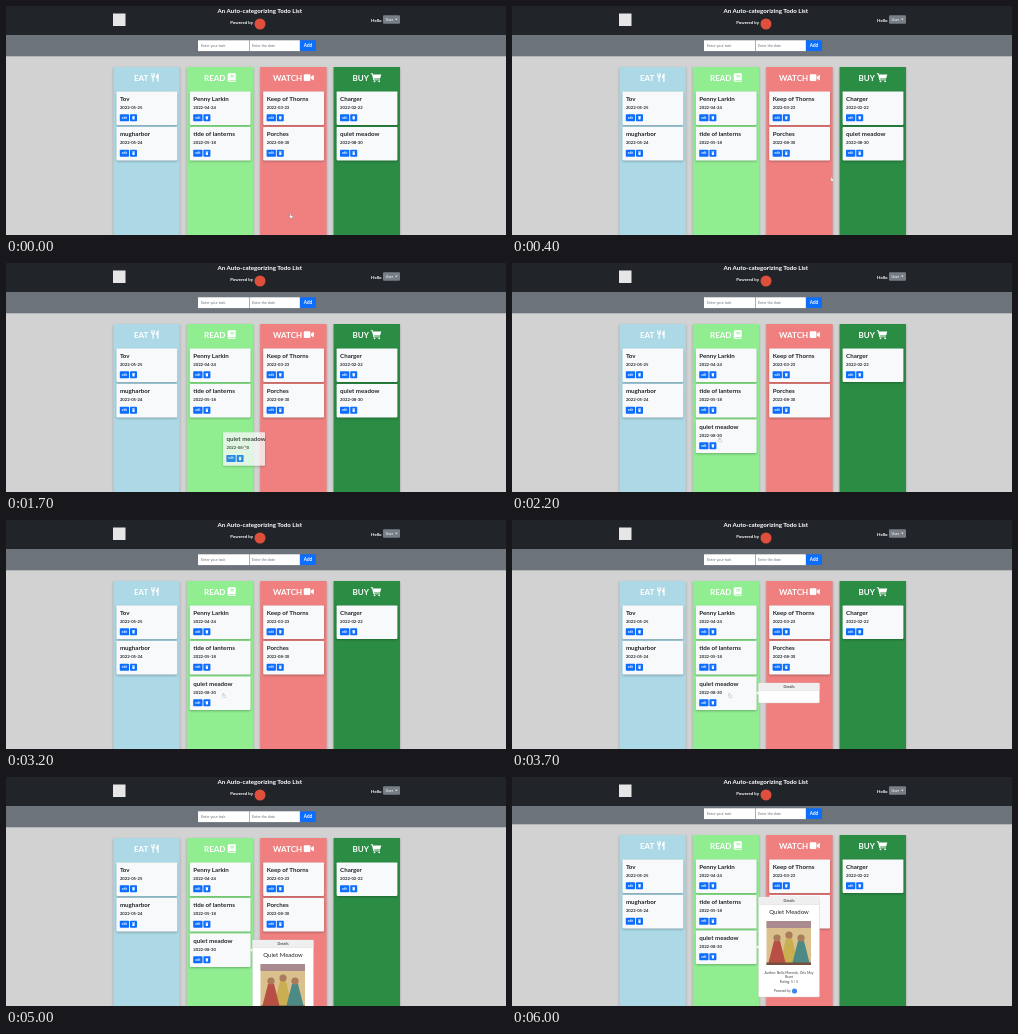
Recreate the animation shown at these times as an HTML page. Size 500 by 229 pixels, loop 6.8 s.

```html
<!DOCTYPE html>
<html lang="en">
<head>
<meta charset="utf-8">
<title>Todo board</title>
<style>
  html, body { margin: 0; height: 100%; overflow: hidden; background: #d2d2d2; }
  svg { display: block; width: 100vw; height: 100vh; }
  text { font-family: Lato, "Open Sans", sans-serif; }
  .b { font-weight: 700; }
  .mid { text-anchor: middle; }
  .card, .col { filter: drop-shadow(0 1px 1.3px #0004); }
</style>
</head>
<body>
<svg id="stage" viewBox="0 0 500 229"></svg>
<script>
const LOOP = 6800, STEP = 100;
const PITCH = 35.5, TOP = 85.5, INSET = 3;

const rect = (x, y, w, h, fill, more = '') =>
  `<rect x="${x}" y="${y}" width="${w}" height="${h}" fill="${fill}" ${more}/>`;
const text = (x, y, size, fill, str, cls = '') =>
  `<text x="${x}" y="${y}" font-size="${size}" fill="${fill}" class="${cls}">${str}</text>`;
const group = (id, body, more = '') => `<g id="${id}" ${more}>${body}</g>`;
const at = (x, y, body) => `<g transform="translate(${x} ${y})">${body}</g>`;

// White heading icons, drawn from their top left corner
const icons = {
  fork: `<path d="M.3 0v3q0 1 1.2 1.2V8.5h1.2V4.2Q3.9 4 3.9 3V0H3.1v2.6H2.5V0H1.7v2.6H1.1V0z
         M7.6 0Q5 1 5 5h1.3v3.5h1.3z"/>`,
  book: `<path d="M1.4 0H8v6.6H7.5v1.2H8v.7H1.5Q0 8.5 0 7V1.4Q0 0 1.4 0z"/>
         <path d="M2.6 2.2h3.8M2.6 3.6h3.8M1.4 7.2h5.5" stroke="#90ee90" stroke-width=".7"/>`,
  video: '<rect y="1" width="6.6" height="6.6" rx="1"/><path d="M7.1 3.4 10 1.4V7.2L7.1 5.2z"/>',
  cart: `<path d="M0 0h1.9l.4 1.1h8.2L9.3 5.3H3.3l.2.8h5.6v.9H2.6L1.2 1H0z"/>
         <circle cx="3.7" cy="8" r=".9"/><circle cx="8.4" cy="8" r=".9"/>`
};

const columns = [
  { x: 107.4, fill: '#add8e6', name: 'EAT', nameX: 128, icon: 'fork', iconX: 145,
    cards: [['Tov', '2022-05-25'], ['mugharbor', '2022-05-24']] },
  { x: 180.8, fill: '#90ee90', name: 'READ', nameX: 198, icon: 'book', iconX: 221.7,
    cards: [['Penny Larkin', '2022-04-24'], ['tide of lanterns', '2022-05-18']] },
  { x: 254.2, fill: '#f08080', name: 'WATCH', nameX: 267, icon: 'video', iconX: 297.8,
    cards: [['Keep of Thorns', '2022-03-23'], ['Porches', '2022-08-30']] },
  { x: 327.6, fill: '#2b8c44', name: 'BUY', nameX: 346.5, icon: 'cart', iconX: 364.8,
    cards: [['Charger', '2022-02-22']] }
];
const movedTask = ['quiet meadow', '2022-08-30'];

function card([title, date], width = 60.8) {
  return rect(0, 0, width, 33.4, '#f8f9fa', 'rx=".8" class="card"') +
    text(3.5, 9.2, 6.2, '#212529', title, 'b') +
    text(3.5, 17.1, 4.2, '#212529', date, 'b') +
    rect(3.4, 22.7, 9.3, 7, '#0d6efd', 'rx=".8"') +
    text(8.05, 27.1, 3.1, '#fff', 'edit', 'b mid') +
    rect(13.6, 22.7, 7, 7, '#0d6efd', 'rx=".8"') +
    '<path d="M15.7 24.4h2.8v.5h-2.8zM15.9 25.2h2.4l-.2 2.8h-2z" fill="#fff"/>';
}

function column(c) {
  return rect(c.x, 61, 66.4, 190, c.fill, 'class="col"') +
    text(c.nameX, 75, 8, '#fff', c.name, 'b') +
    `<g fill="#fff" transform="translate(${c.iconX} 67.3)">${icons[c.icon]}</g>` +
    c.cards.map((t, i) => at(c.x + INSET, TOP + i * PITCH, card(t))).join('');
}

const header =
  rect(0, 0, 500, 29, '#212529') +
  rect(107, 7.5, 12.5, 12.5, '#e6e6e6') +
  text(253.8, 7, 6.2, '#fff', 'An Auto-categorizing Todo List', 'b mid') +
  text(224.3, 18.3, 4.3, '#fff', 'Powered by', 'b') +
  '<circle cx="254" cy="18" r="5.5" fill="#de4f3c"/>' +
  text(365, 15.6, 4.5, '#fff', 'Hello', 'b') +
  rect(377, 9.3, 17, 8.4, '#777e85', 'rx="1"') +
  text(379.5, 14.8, 3.8, '#fff', 'User') +
  '<path d="M389 12.7h2.6l-1.3 1.4z" fill="#fff"/>';

const form =
  rect(0, 25, 500, 25.3, '#6c737a') +
  rect(192, 34.3, 51.3, 10.8, '#fff') + rect(243.8, 34.3, 50, 10.8, '#fff') +
  text(195, 40.9, 3.7, '#6c757d', 'Enter your task') +
  text(246, 40.9, 3.7, '#6c757d', 'Enter the date') +
  rect(294, 34.3, 16, 10.8, '#0d6efd', 'rx="1"') +
  text(302, 41.3, 4.6, '#fff', 'Add', 'b mid');

const dress = (x, y, fill) =>
  `<path d="M${x - 3} ${y}h6l6 ${187.5 - y}h-18z" fill="${fill}"/>
   <circle cx="${x}" cy="${y - 3}" r="3.6" fill="#a97b5c"/>`;
const cover = rect(254.5, 144, 44.5, 44, '#d9c08c') +
  rect(254.5, 144, 44.5, 7, '#a98a8e') +
  dress(277, 161, '#c9ae52') + dress(265, 164, '#b84f45') + dress(289, 164, '#4d8a86') +
  rect(254.5, 185.5, 44.5, 2.5, '#75503f');

const details =
  text(277, 137.2, 6, '#212529', 'Quiet Meadow', 'mid') + cover +
  text(277, 196.7, 3.4, '#444', 'Author: Nella Marwick, Orla May', 'mid') +
  text(277, 201.2, 3.4, '#444', 'Brant', 'mid') +
  text(277, 205.8, 3.4, '#444', 'Rating: 5 / 5', 'mid') +
  text(262, 215.2, 3.2, '#444', 'Powered by') +
  '<circle cx="282.5" cy="214" r="2.6" fill="#4285f4"/>';

const popover =
  '<path id="arrow" d="M246.8 -2.5v5l-2.4-2.5z" fill="#fff"/>' +
  rect(246.5, 120, 61, 100, '#fff', 'id="panel" rx="1.2" stroke="#c4c4c4" stroke-width=".4"') +
  rect(246.7, 120.2, 60.6, 7.4, '#efefef') + rect(246.7, 127.5, 60.6, .3, '#ccc') +
  text(277, 125.2, 3.6, '#212529', 'Details', 'mid') + group('details', details);

const pointer = `<path d="M0-2q.5-.4.8.1v1.4l1.6.4q.5.2.3.8L2.3 2H.4L-.8.4q0-.6.8-.2z"
  fill="#fff" stroke="#777" stroke-width=".3"/>`;

document.getElementById('stage').innerHTML =
  rect(0, 0, 500, 229, '#d2d2d2') +
  group('page', form + columns.map(column).join('') + group('task', card(movedTask))) +
  header + group('popover', popover) +
  group('ghost', card(movedTask, 42), 'opacity=".78"') + group('cursor', pointer);

const el = id => document.getElementById(id);
const move = (id, x, y) => el(id).setAttribute('transform', `translate(${x} ${y})`);
const show = (id, on) => el(id).setAttribute('visibility', on ? 'visible' : 'hidden');
const clamp = v => Math.min(1, Math.max(0, v));

// Cursor stops: time, x, y
const path = [
  [0, 284, 210], [800, 354, 136], [1300, 351, 136], [1700, 238, 184.5],
  [2000, 207, 177], [2700, 207, 177], [3200, 217, 175.5], [LOOP, 217, 175.5]
];
function cursorAt(t) {
  const i = path.findIndex(p => p[0] > t);
  const [t0, x0, y0] = path[i - 1], [t1, x1, y1] = path[i];
  const k = (t - t0) / (t1 - t0), e = k * k * (3 - 2 * k);
  return [x0 + (x1 - x0) * e, y0 + (y1 - y0) * e];
}

function draw(t) {
  const [x, y] = cursorAt(t);
  move('cursor', x, y);
  show('cursor', t < 5000);

  move('ghost', x - 21, y - 15.2);
  show('ghost', t >= 1400 && t < 2000);

  const lift = t >= 700 && t < 1400 ? 1 : 0;
  if (t < 2000) move('task', columns[3].x + INSET, TOP + PITCH - lift);
  else move('task', columns[1].x + INSET, TOP + 2 * PITCH);

  const scroll = 3 * clamp((t - 5600) / 400);
  move('page', 0, -scroll);

  // The popover is centred on its card only once scrolling makes it reposition
  const loaded = t >= 3800, centred = t >= 5700;
  const top = centred ? 3 - scroll : 43;
  move('popover', 0, top);
  move('arrow', 0, 173 - scroll - top);
  el('popover').setAttribute('opacity', clamp((t - 3400) / 200));
  el('panel').setAttribute('height', loaded ? 100 : 20);
  el('details').setAttribute('display', loaded ? 'inline' : 'none');
}

const start = performance.now();
function tick() {
  const t = (performance.now() - start) % LOOP;
  draw(Math.floor(t / STEP) * STEP);
  requestAnimationFrame(tick);
}
tick();
</script>
</body>
</html>
```
